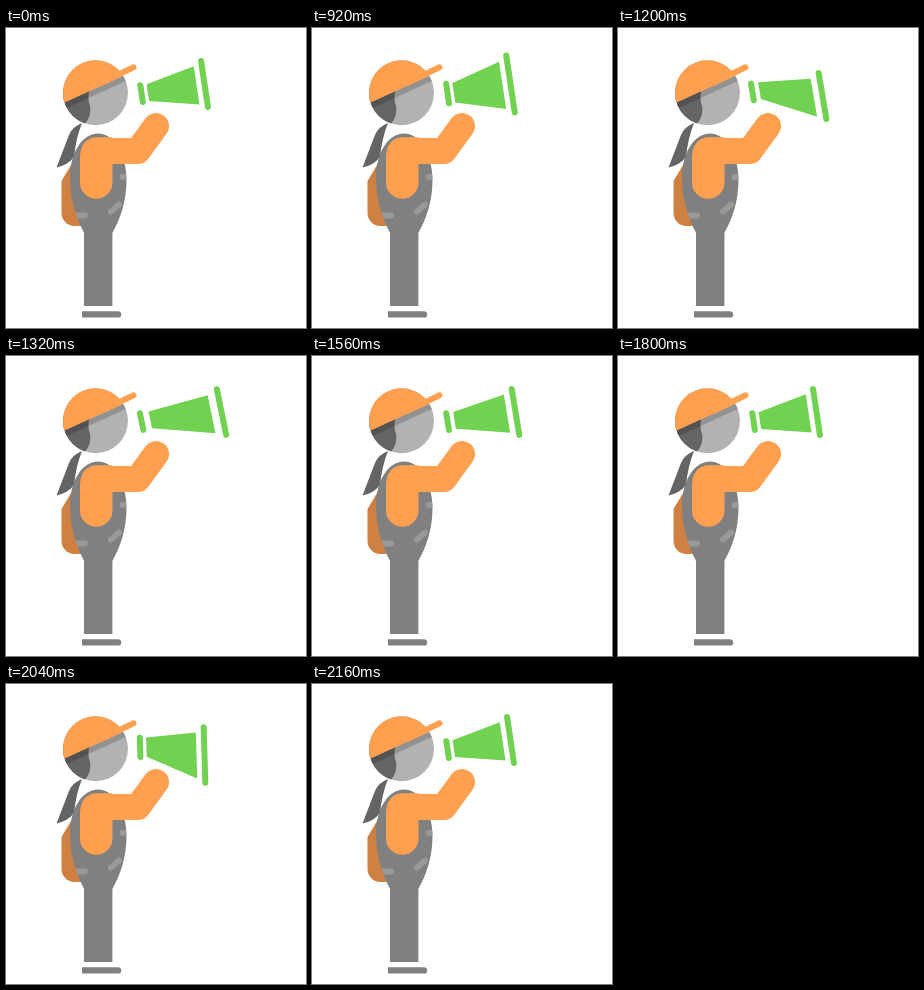
An HTML page that plays this animation: 300 by 300 pixels, repeating every 2.2 s.

```html
<!DOCTYPE html>
<html lang="en">
<head>
<meta charset="utf-8">
<title>Megaphone</title>
<style>
  html, body { margin: 0; width: 100%; height: 100%; overflow: hidden; background: #fff; }
  svg { display: block; width: 100%; height: 100%; }
  .round { fill: none; stroke-linecap: round; stroke-linejoin: round; stroke-width: 6; }
</style>
</head>
<body>
<svg viewBox="0 0 300 300">
  <defs>
    <clipPath id="head"><circle cx="89.5" cy="64.7" r="32.5"/></clipPath>
    <clipPath id="torso"><use href="#body"/></clipPath>
  </defs>

  <path fill="#d08040" d="M74 122L55.5 153V185A13 13 0 0 0 68.5 198H79V122Z"/>
  <path fill="#646464" d="M76 95Q66 99 63 107L50.5 139.5Q62 137 68 129Q70 110 76 95Z"/>

  <path id="body" fill="#808080" d="M92 105.5C109 105.5 120.5 127 120.5 152C120.5 174 114 191 106.4 205V278H78V205C71 191 64 173 64 150C64 125 76 105.5 92 105.5Z"/>
  <g class="round" stroke="#999" clip-path="url(#torso)">
    <path d="M60 187.5H79M105 183.5L113 176.5M116.5 149H126"/>
  </g>
  <path fill="#808080" d="M76 283.2H112A3.2 3.2 0 0 1 112 289.6H76Z"/>

  <g clip-path="url(#head)">
    <path fill="#b2b2b2" d="M50 30H125V100H50Z"/>
    <path fill="#646464" d="M50 60H84C81 70 83 74 84.3 79C85 87 82 93 77 98H50Z"/>
    <path fill="#000" fill-opacity=".18" d="M50 78.5L125 44V50.5L50 85Z"/>
    <path fill="#ffa050" d="M50 30H125V44L50 78.5Z"/>
  </g>
  <path class="round" stroke="#ffa050" d="M95 55L127.5 39.3"/>

  <path fill="#ffa050" d="M74 154.5V129C74 117 81 109.3 91 109.3H106.5V154.5A16.25 16.25 0 0 1 74 154.5Z"/>
  <path class="round" stroke="#ffa050" style="stroke-width:26" d="M91 123H131.8L150 98"/>

  <path id="cone" fill="#70d250"/>
  <path id="rims" class="round" stroke="#70d250"/>
</svg>
<script>
  const LOOP = 2200;

  // Key poses: lift raises the horn, reach lengthens it, flare widens its rim.
  const rest = {};
  const wide = { flare: 11 };
  const wideUp = { lift: 15, flare: 9 };
  const wideDown = { lift: -15, flare: 9 };
  const farUp = { lift: 12, reach: 6 };
  const farDown = { lift: -12, reach: 6 };
  const far = { reach: 17 };
  const middle = { reach: 5 };

  // Two shouts: the first alternates short and long beats, the second is even.
  const firstShout = [wide, wideUp, farUp, farDown, far, wideUp];
  const secondShout = [middle, wide, rest, wideUp, wideDown, rest];
  const steps = [
    { start: 0, pose: rest },
    ...firstShout.map((pose, i) => ({ start: 920 + 100 * i - 20 * (i % 2), pose })),
    ...secondShout.map((pose, i) => ({ start: 1560 + 120 * i, pose }))
  ];

  const cone = document.getElementById('cone');
  const rims = document.getElementById('rims');

  // A leaning bar; at() gives the point at fraction t, moved sideways by gap.
  function bar(x, y, length, lean) {
    const ux = Math.sin(lean), uy = Math.cos(lean);
    const at = (t, gap = 0) => {
      const along = (t - 0.5) * length;
      return [x + ux * along + uy * gap, y + uy * along - ux * gap];
    };
    return { at, path: `M${at(0)}L${at(1)}` };
  }

  function draw({ lift = 0, reach = 0, flare = 0 }) {
    const lean = (8.5 + 0.18 * reach + 0.05 * lift * flare) * Math.PI / 180;
    const mouth = bar(135.6 + 0.1 * lift, 65.6 + 0.15 * lift, 17 + 0.25 * flare, lean);
    const horn = bar(198.5 + reach, 56 - lift, 46.5 + flare, lean);
    const back = 6.3 + 0.15 * reach, front = -8 - 0.13 * reach;
    const corners = [mouth.at(0, back), horn.at(0.09, front), horn.at(0.92, front), mouth.at(1, back)];
    cone.setAttribute('d', `M${corners.join('L')}Z`);
    rims.setAttribute('d', mouth.path + horn.path);
  }

  function tick() {
    const time = performance.now() % LOOP;
    draw(steps.findLast(({ start }) => start <= time).pose);
    requestAnimationFrame(tick);
  }

  draw(rest);
  requestAnimationFrame(tick);
</script>
</body>
</html>
```
